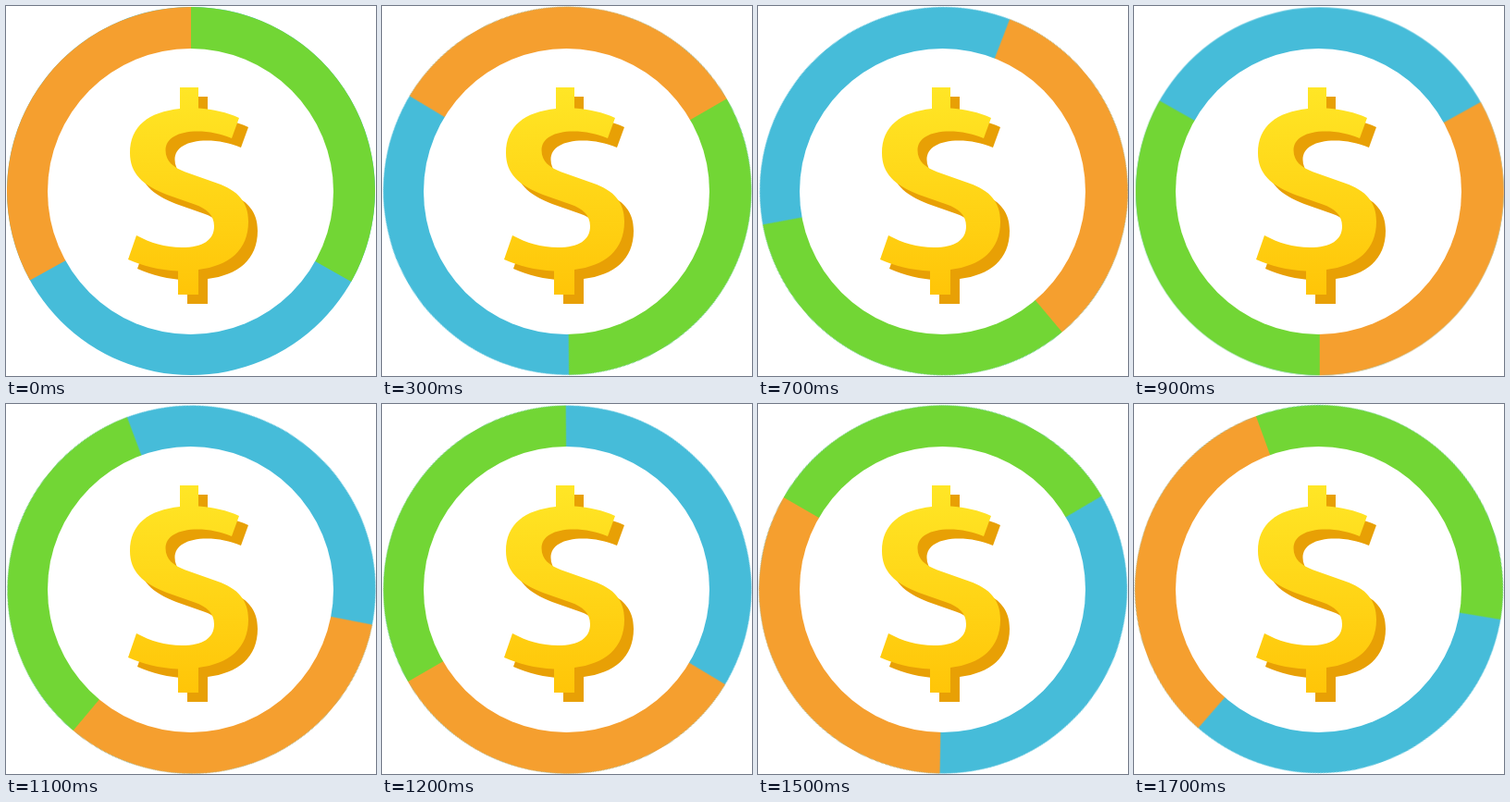
Animation of 400x400 px, one loop 1.8 s. Source, as an HTML page:

```html
<!DOCTYPE html>
<html lang="en">
<head>
<meta charset="utf-8">
<title>Dollar ring</title>
<style>
  html, body { margin: 0; width: 100%; height: 100%; overflow: hidden; background: #fff; }
  svg { display: block; width: 400px; height: 400px; }
  .ring {
    transform-origin: 200.4px 200.2px;
    animation: turn 1.8s steps(18) infinite;
  }
  @keyframes turn { to { transform: rotate(360deg); } }
</style>
</head>
<body>
<svg viewBox="0 0 400 400">
  <defs>
    <linearGradient id="gold" gradientUnits="userSpaceOnUse" x1="0" y1="88" x2="0" y2="312">
      <stop offset="0" stop-color="#ffe626"/>
      <stop offset="1" stop-color="#ffc508"/>
    </linearGradient>
    <path id="dollar" d="M188 88H208V110.500C224 111.500 239 115 252 121L244 143
      C232 138 220 135.500 207 135.500C186 135.500 172.500 143 172.500 156
      C172.500 168 181 174.500 194 179.500L228 191.500C251 199.500 262 212 262 233
      C262 264 241 281 208 285V312H186V286.500C165 285.500 148 281 132 274L141 248
      C156 256 172 261 190 261C213 261 225 253 225 238
      C225 226 217 219 204 214.500L174 204C148 194 134 181 134 159
      C134 130 154 114.500 188 111Z"/>
  </defs>
  <g class="ring">
    <circle cx="200" cy="200" r="199" fill="#46bcd9"/>
    <path d="M200 200V1A199 199 0 0 1 373.200 298Z" fill="#72d635"/>
    <path d="M200 200L25.950 296.480A199 199 0 0 1 200 1Z" fill="#f59f2f"/>
  </g>
  <circle cx="199.500" cy="200.500" r="154.500" fill="#fff"/>
  <use href="#dollar" x="10" y="10" fill="#e8a005"/>
  <use href="#dollar" fill="url(#gold)"/>
</svg>
</body>
</html>
```
